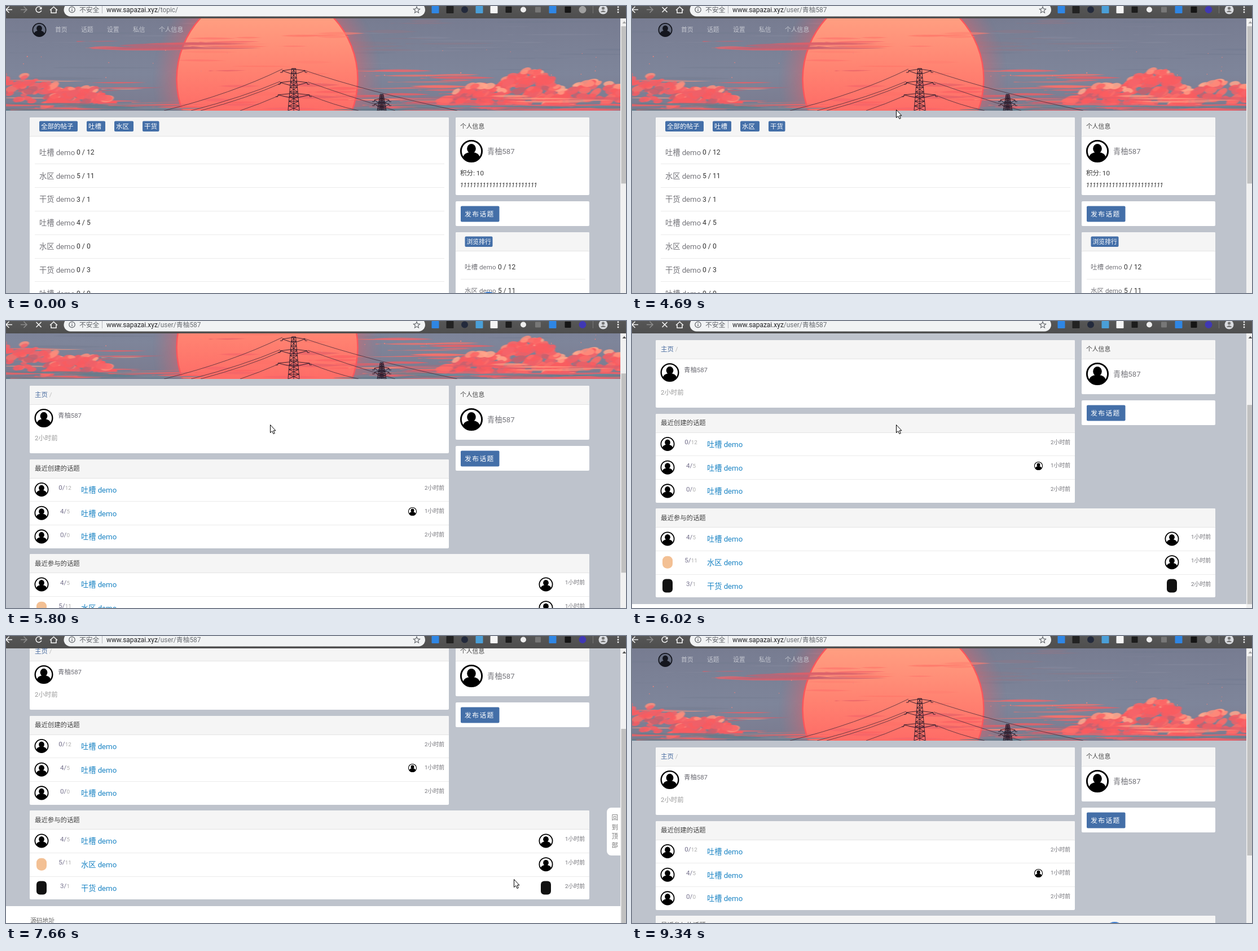
These frames come from a looping animation (1099 by 510 pixels, 9.45 s). An HTML page:

```html
<!DOCTYPE html>
<html lang="zh">
<head>
<meta charset="utf-8">
<title>话题</title>
<style>
  html, body { margin: 0; width: 100%; height: 100%; overflow: hidden; background: #bec3cc; }
  svg { display: block; }
  text { font-family: Roboto, "Noto Sans CJK SC", "Noto Sans CJK", sans-serif; white-space: pre; }
</style>
</head>
<body>
<svg id="stage" width="1099" height="510" viewBox="0 0 1099 510"></svg>
<script>
const LOOP = 9450, TICK = 78;
const USER = '青柚587', BLUE = '#446fa8';

// ---- drawing helpers
const rect = (x, y, w, h, fill, r = 0) =>
  `<rect x="${x}" y="${y}" width="${w}" height="${h}" rx="${r}" fill="${fill}"/>`;
const circle = (x, y, r, fill) => `<circle cx="${x}" cy="${y}" r="${r}" fill="${fill}"/>`;
const line = (d, color, w = 1) =>
  `<path d="${d}" fill="none" stroke="${color}" stroke-width="${w}"/>`;
// text placed by its vertical middle
const text = (x, mid, s, size, fill, extra = '') =>
  `<text x="${x}" y="${mid + size * 0.37}" font-size="${size}" fill="${fill}" ${extra}>${s}</text>`;
const avatar = (x, y, r, back = '#fff', ink = '#000') =>
  `<g transform="translate(${x} ${y}) scale(${r / 20})" fill="${ink}">
    <circle r="18.6" fill="${back}" stroke="${ink}" stroke-width="2.9"/>
    <ellipse cy="-4.5" rx="7.8" ry="8.4"/>
    <path d="M-15 11C-13 4 -8 3 -4 2H4C8 3 13 4 15 11A18.6 18.6 0 0 1-15 11Z"/></g>`;
const card = (x, y, w, h, head = 33) => rect(x, y, w, h, '#fff', 2) +
  (head ? rect(x, y, w, head, '#f5f5f5', 2) + rect(x, y + head, w, 1, '#e4e4e4') : '');
const pill = (x, y, w, s, size = 11.5) => rect(x, y, w, 18.5, BLUE, 2) +
  text(x + 3, y + 9.3, s, size, '#fff', 'font-weight="500"');
const postButton = y => card(797, y, 237, 44, 0) + rect(806, y + 8.5, 68.5, 28, BLUE, 2) +
  text(813, y + 22.5, '发布话题', 11.8, '#fff', 'letter-spacing="1.4" font-weight="500"');

let seed = 11;
const rnd = (a = 0, b = 1) => {
  seed = (seed * 16807) % 2147483647;
  return a + (b - a) * seed / 2147483647;
};
const pick = list => list[Math.floor(rnd(0, list.length))];
const repeat = (n, f) => Array.from({ length: n }, (_, i) => f(i)).join('');

// ---- banner
function streaks(n, x0, x1, y0, y1, len, thick, colors, opacity = 0.7) {
  return repeat(n, () => {
    const l = rnd(len * 0.3, len), h = rnd(thick * 0.3, thick);
    return `<path d="M${rnd(x0, x1) - l / 2} ${rnd(y0, y1)}q${l * 0.4} ${-h} ${l} ${rnd(-2, 1)}q${-l * 0.5} ${h} ${-l} 0"
      fill="${pick(colors)}" opacity="${opacity}"/>`;
  });
}

// puffs thrown under an arch, light along its rim and dusky below
function cloud(cx, base, w, h, n) {
  return repeat(n, () => {
    const u = rnd(-1, 1), v = Math.sqrt(rnd()), r = rnd(3, 8);
    const x = cx + u * w, y = base - h * (1 - u * u) * v;
    const fill = v > 0.93 ? pick(['#ff8f7c', '#ffa78c', '#fb6565'])
      : pick(['#f95c60', '#f95c60', '#ee6068', '#fd6c69', v < 0.6 ? '#c4626f' : '#f4646a']);
    return `<ellipse cx="${x}" cy="${y}" rx="${r * 1.6}" ry="${r * 0.8}" fill="${fill}" opacity=".85"
      transform="rotate(${rnd(-35, 10)} ${x} ${y})"/>`;
  });
}

function pylon(x, top, base, half, arms) {
  const n = 9, leg = i => half * (0.35 + 0.65 * i / n), yy = i => top + (base - top) * i / n;
  let d = `M${x - leg(0)} ${top}L${x - half} ${base}M${x + leg(0)} ${top}L${x + half} ${base}M${x} ${top}V${base}`;
  for (let i = 0; i < n; i++)
    d += `M${x - leg(i)} ${yy(i)}H${x + leg(i)}L${x - leg(i + 1)} ${yy(i + 1)}M${x - leg(i)} ${yy(i)}L${x + leg(i + 1)} ${yy(i + 1)}`;
  for (const [y, reach] of arms)
    d += `M${x - reach} ${y}L${x} ${y - 3}L${x + reach} ${y}L${x + 6} ${y + 5}H${x - 6}Z` +
      `M${x - reach} ${y}v3h-4M${x + reach} ${y}v3h4`;
  return line(d, '#2b1b2b', 0.95);
}

function banner() {
  const coral = ['#fb5a5f', '#f4646a', '#fd7068', '#e25d68'];
  const warm = [...coral, '#ff9a80', '#c9606e'];
  const wires = 'M490 112Q400 156 280 186M486 134Q420 162 328 186M488 137Q430 163 345 186M482 160Q450 174 415 186' +
    'M528 114Q640 152 800 186M535 135Q600 158 690 186M537 158Q580 176 625 186';
  return `<defs>
    <linearGradient id="sky" x2="0" y2="1"><stop stop-color="#777c91"/><stop offset=".6" stop-color="#7e859a"/><stop offset="1" stop-color="#7a7a8e"/></linearGradient>
    <linearGradient id="sun" x2="0" y2="1"><stop offset=".16" stop-color="#ff9f81"/><stop offset=".45" stop-color="#ff8271"/><stop offset=".7" stop-color="#fe6965"/><stop offset="1" stop-color="#fa595e"/></linearGradient>
    <radialGradient id="glow"><stop offset=".78" stop-color="#d9656f" stop-opacity=".55"/><stop offset="1" stop-color="#b56c7c" stop-opacity="0"/></radialGradient>
    <filter id="paint"><feGaussianBlur stdDeviation="1.1 .7"/></filter>
    <clipPath id="frame"><rect y="22" width="1089" height="164"/></clipPath></defs>
  <g clip-path="url(#frame)">` +
    rect(0, 22, 1089, 164, 'url(#sky)') +
    `<g filter="url(#paint)">` +
    streaks(40, 0, 1089, 26, 130, 200, 4, ['#727a8f', '#868a9e', '#757c90'], 0.5) +
    streaks(10, 620, 800, 26, 80, 160, 6, ['#8d7888', '#857a8c'], 0.5) +
    circle(463, 130, 202, 'url(#glow)') + '</g>' +
    `<circle cx="463" cy="130" r="160.5" fill="url(#sun)" stroke="#fb565c" stroke-width="2.5"/>` +
    `<g filter="url(#paint)">` +
    streaks(14, 160, 410, 63, 78, 200, 7, ['#d8606b', '#f4646a', '#c7606f']) +
    streaks(12, 340, 600, 48, 115, 120, 6, ['#ff7f70', '#fd706a', '#ff7468'], 0.6) +
    streaks(14, 320, 610, 115, 184, 130, 7, coral, 0.6) +
    streaks(24, 620, 830, 112, 182, 150, 5, coral) +
    streaks(16, 20, 310, 130, 183, 150, 4, warm) +
    cloud(20, 178, 110, 58, 130) + cloud(130, 176, 62, 32, 60) +
    cloud(925, 176, 78, 62, 120) + cloud(840, 174, 75, 34, 80) + cloud(1045, 176, 90, 42, 90) +
    streaks(30, 650, 1089, 156, 184, 180, 5, warm) +
    streaks(34, 0, 310, 174, 187, 170, 5, ['#5d7e8e', '#7c8796', '#fb5f60']) +
    streaks(34, 630, 1089, 176, 187, 170, 5, ['#5d7e8e', '#71899a', '#f06068']) + '</g>' +
    repeat(30, () => circle(rnd(0, 1089), rnd(75, 140), rnd(0.4, 1.1), '#f3837c')) +
    line(wires, '#4a2c3a', 0.8) +
    pylon(510, 111, 186, 10, [[115, 20], [136, 24], [158, 28]]) +
    pylon(666, 157, 186, 8, [[167, 13], [174, 13]]) +
    avatar(59, 42.5, 12.5, '#666d80', '#14161e') +
    ['首页', '话题', '设置', '私信', '个人信息'].map((s, i) =>
      text(87 + 46 * i, 42.5, s, 10.8, '#c3c6cf')).join('') +
  '</g>';
}

// ---- pages
const topics = [['吐槽', '0 / 12'], ['水区', '5 / 11'], ['干货', '3 / 1'], ['吐槽', '4 / 5'],
  ['水区', '0 / 0'], ['干货', '0 / 3'], ['吐槽', '0 / 0']];

function topicPage() {
  return card(42, 198, 743, 400) +
    pill(59, 204.5, 68, '全部的帖子') + pill(143, 204.5, 33, '吐槽') +
    pill(192, 204.5, 34, '水区') + pill(242, 204.5, 29.5, '干货') +
    topics.map(([name, count], i) => {
      const y = 260 + 41.8 * i;
      return text(59, y, name + ' demo', 13.2, '#74747a') + text(125, y - 0.5, count, 12.2, '#333') +
        rect(51, Math.round(y + 20.3), 726, 1, '#ebebeb');
    }).join('') +
    card(797, 198, 237, 138) + text(805, 214, '个人信息', 10.8, '#444') +
    avatar(825, 258, 20) + text(853, 258, USER, 13.2, '#74747a') +
    text(805, 297, '积分: 10', 11.6, '#333') +
    text(805, 318.5, '1'.repeat(24), 10.45, '#222', 'font-style="italic"') +
    postButton(347) +
    card(797, 402, 237, 200) + pill(813.5, 409.5, 49, '浏览排行', 10.8) +
    topics.slice(0, 2).map(([name, count], i) =>
      text(813, 464 + 41.7 * i, name + ' demo', 11.6, '#74747a') +
      text(872, 463.5 + 41.7 * i, count, 12, '#333')).join('') +
    rect(806, 485, 221, 1, '#ebebeb');
}

function topicRow(y, right, [name, a, b, when], icon, lastIcon) {
  return icon(63, y - 0.5, 12.5) +
    text(104.5, y - 4, `${a}/<tspan font-size="9.8" fill="#aaa">${b}</tspan>`, 11.6, '#74708c', 'text-anchor="middle"') +
    text(133, y, name + ' demo', 13.2, '#1b84c4') +
    text(right, y - 4, when, 9.8, '#74747a', 'text-anchor="end"') + (lastIcon || '');
}

function userPage() {
  const peach = (x, y) => rect(x - 9, y - 11, 18, 22, '#f3c094', 8);
  const dark = (x, y) => rect(x - 9, y - 12, 18, 24, '#111', 6);
  const own = [['吐槽', 0, 12, '2小时前'], ['吐槽', 4, 5, '1小时前'], ['吐槽', 0, 0, '2小时前']];
  const joined = [['吐槽', 4, 5, '1小时前'], ['水区', 5, 11, '1小时前'], ['干货', 3, 1, '2小时前']];
  const icons = [avatar, peach, dark], lastIcons = [avatar, avatar, dark];
  const rule = (y, w) => rect(42, y, w, 1, '#ebebeb');
  return card(42, 198, 743, 120) +
    text(51, 214, '主页 <tspan fill="#bbb">/</tspan>', 11.5, '#4a6da0') +
    avatar(67, 255.5, 16.5) + text(92, 251, USER, 11.4, '#6c6c74') + text(51, 290.5, '2小时前', 11.4, '#999') +
    card(42, 329, 743, 158) + text(51, 345, '最近创建的话题', 11.4, '#444') +
    own.map((row, i) => topicRow(383 + 41.7 * i, 777, row, avatar, i === 1 && avatar(720.5, 421.5, 7.6))).join('') +
    rule(403, 743) + rule(445, 743) +
    card(42, 497, 992, 158) + text(51, 513.5, '最近参与的话题', 11.4, '#444') +
    joined.map((row, i) => {
      const y = 551.5 + 41.7 * i;
      return topicRow(y, 1026, row, icons[i], lastIcons[i](957, y - 0.5, 12.5));
    }).join('') +
    rule(572, 992) + rule(614, 992) +
    card(797, 198, 237, 96) + text(805, 214, '个人信息', 10.8, '#444') +
    avatar(825, 258, 20) + text(853, 258, USER, 13.2, '#74747a') + postButton(305) +
    rect(0, 667, 1089, 200, '#fff') + text(43, 693, '源码地址', 10.8, '#666');
}

// ---- browser bar
function toolbar() {
  const white = '#f2f2f2';
  const sq = (x, fill, s = 13) => rect(x - s / 2, 6.5 - s / 2, s, s, fill, 1);
  return `<linearGradient id="bar" x2="0" y2="1"><stop stop-color="#565656"/><stop offset="1" stop-color="#4e4e4e"/></linearGradient>` +
    rect(0, 0, 1099, 22, 'url(#bar)') +
    line('M11 6.5H0M5.5 1L0 6.5L5.5 12', white, 1.6) +
    line('M26 6.5H37M31.5 1L37 6.5L31.5 12', '#8c8c8c', 1.6) +
    `<g id="reload">${line('M62 3.2A5 5 0 1 0 62.8 8', white, 1.6)}<path d="M63.5 1v5h-5z" fill="${white}"/></g>` +
    `<g id="stop">${line('M53.5 2L62.5 11M62.5 2L53.5 11', white, 1.7)}</g>` +
    line('M78 7.5L84.5 1.5L91 7.5M80 6.5V12.2H89V6.5', white, 1.6) +
    rect(102.5, -5, 640.5, 23.5, '#f1f3f4', 11.7) +
    `<circle cx="117" cy="6.5" r="5.2" fill="none" stroke="#5f6368" stroke-width="1.2"/>` +
    line('M117 5.8V9.5M117 3.4V4.8', '#5f6368', 1.3) +
    text(130, 6.5, '不安全', 11.8, '#5f6368') + rect(170, 0, 1, 13, '#b5b8bc') +
    text(178, 6.5, 'www.sapazai.xyz<tspan id="path" fill="#6b6f74"></tspan>', 11.9, '#202124') +
    `<path d="M728 1.2l1.6 3.7 4 .4-3 2.7.9 4-3.5-2.1-3.5 2.1.9-4-3-2.7 4-.4z" fill="none" stroke="#5f6368" stroke-width="1.1"/>` +
    sq(761, '#2f86e4') + sq(787, '#222') + circle(813, 6.5, 6, '#232a3c') + sq(839, '#4a9fd8') +
    sq(865, '#f5f5f5') + sq(891, '#1c1c1c', 11) + circle(917, 6.5, 5, '#eee') + sq(943, '#777', 10) +
    sq(969, '#2f86e4') + sq(996, '#151515', 11) + `<circle id="ext" cx="1022" cy="6.5" r="6.5"/>` +
    rect(1040, 0, 1, 13, '#777') + circle(1058.5, 6.5, 8, '#dadce0') + circle(1058.5, 4, 2.6, '#777') +
    `<path d="M1053.5 11q5-6 10 0z" fill="#777"/>` +
    [2, 6.5, 11].map(y => circle(1085, y, 1.4, white)).join('');
}

const stage = document.getElementById('stage');
stage.innerHTML = rect(0, 0, 1099, 510, '#bec3cc') +
  `<g id="doc">${banner()}<g id="topics">${topicPage()}</g><g id="user">${userPage()}</g></g>
  <g id="totop"><path d="M1089 305H1073a8 8 0 0 0-8 8V382a8 8 0 0 0 8 8H1089Z" fill="#fff"/>` +
  [...'回到顶部'].map((c, i) => text(1073.5, 323 + 16.3 * i, c, 11.4, '#777')).join('') + '</g>' +
  rect(1089, 22, 10, 488, '#f1f1f1') + '<path id="up" d="M1092.5 31L1096 27L1099.5 31Z"/>' +
  '<rect id="thumb" x="1090.5" width="9" fill="#c1c1c1"/>' + toolbar() +
  `<circle id="dot" cx="855.5" cy="527" r="19" fill="#3f7fd0"/>
  <g id="cursor" fill="#fff" stroke="#000" stroke-linejoin="round">
    <path id="arrow" d="M.5 .5V14.5L3.8 11.6 6 16.6 8.3 15.6 6.1 10.8H10Z"/>
    <path id="hand" d="M-1.7 1.5q1.7-2.8 3.4 0v5l5 1.2q2 .8 1.8 3l-.8 4.5-1.2 2.5v1.8h-7v-1.8l-3.8-5.5q-1.2-2.6 .8-2.4l1.8 1.8z"/></g>`;

const el = Object.fromEntries([...stage.querySelectorAll('[id]')].map(e => [e.id, e]));

// ---- motion: [time, values...]
const cursorKeys = [[400, 606, 328], [1110, 61, 44], [1739, 61, 44], [1740, 67, 47], [1892, 67, 47],
  [2200, 490, 173], [2362, 490, 173], [2830, 461, 183], [3129, 461, 183], [3130, 463, 184], [4689, 463, 184],
  [4690, 468, 184], [7192, 468, 184], [7660, 900, 432], [7740, 960, 410], [7900, 1075, 352], [8350, 1075, 352],
  [8730, 1049, 489], [8790, 1050, 500]];
const scrollKeys = [[5482, 0], [5800, 83], [6020, 164], [6722, 164], [7040, 187], [8030, 187], [8270, 93], [8510, 0]];
const buttonKeys = [[6252, 24], [6550, 0], [8250, 0], [8430, 24]];

function glide(keys, t) {
  const i = keys.findLastIndex(k => k[0] <= t);
  if (i < 0) return keys[0].slice(1);
  const a = keys[i], b = keys[i + 1];
  if (!b) return a.slice(1);
  const p = Math.min(1, Math.floor((t - a[0] + 4) / TICK) * TICK / (b[0] - a[0]));
  return a.slice(1).map((v, j) => Math.round(v + (b[j + 1] - v) * p));
}

const show = (e, on) => e.setAttribute('display', on ? 'inline' : 'none');
const within = (t, a, b) => t >= a && t < b;

function draw(t) {
  const onUser = t >= 5010, [scroll] = glide(scrollKeys, t), [x, y] = glide(cursorKeys, t);
  const [slide] = glide(buttonKeys, t);
  const hand = within(t, 1030, 1966) || within(t, 7896, 8424), loading = within(t, 1560, 6330);
  show(el.topics, !onUser);
  show(el.user, onUser);
  el.doc.setAttribute('transform', `translate(0 ${-scroll})`);
  el.thumb.setAttribute('y', 36 + scroll * 0.69);
  el.thumb.setAttribute('height', onUser ? 354 : 279.5);
  el.up.setAttribute('fill', scroll ? '#505050' : '#a3a3a3');
  show(el.totop, slide < 24);
  el.totop.setAttribute('transform', `translate(${slide} 0)`);
  show(el.stop, loading);
  show(el.reload, !loading);
  el.path.textContent = t < 1740 ? '/topic/' : '/user/' + USER;
  el.ext.setAttribute('fill', within(t, 1740, 8270) ? '#4038b4' : '#a0a0a0');
  show(el.dot, !within(t, 1350, 9340));
  show(el.cursor, within(t, 400, 8870));
  el.cursor.setAttribute('transform', `translate(${x} ${y})`);
  show(el.arrow, !hand);
  show(el.hand, hand);
}

const start = performance.now();
function frame() {
  draw((performance.now() - start) % LOOP);
  requestAnimationFrame(frame);
}
frame();
</script>
</body>
</html>
```
